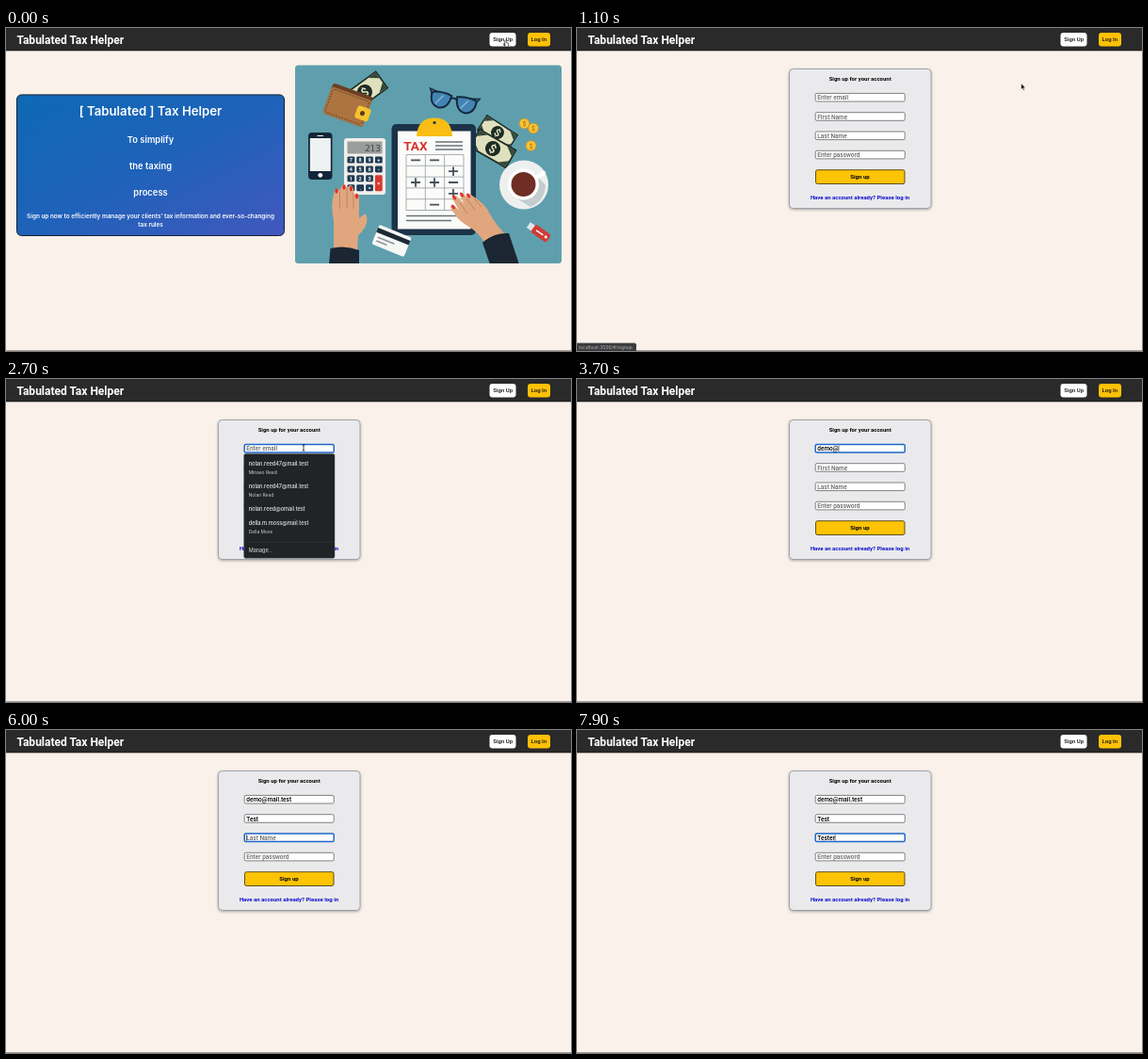
Animation of 600x343 px, one loop 8 s. Source, as an HTML page:

```html
<!DOCTYPE html>
<html lang="en">
<head>
<meta charset="utf-8">
<title>Tax sign-up</title>
<style>
  html, body { margin: 0; width: 100%; height: 100%; overflow: hidden; background: #faf2ea; }
  svg { display: block; width: 100%; height: 100%; }
  text { font-family: Roboto, sans-serif; font-weight: 500; white-space: pre; }
  .ui text, text.ui { font-family: Inter, sans-serif; }
  .hero text { font-family: Inter, sans-serif; font-weight: 600; }
  .mid { text-anchor: middle; }
  .bold { font-weight: 700; }
</style>
</head>
<body>
<svg viewBox="0 0 600 343">
  <defs>
    <linearGradient id="heroFill" x1="0" y1="0" x2="1" y2="1">
      <stop offset="0" stop-color="#0e69b4"/><stop offset=".5" stop-color="#1f62b9"/><stop offset="1" stop-color="#4258be"/>
    </linearGradient>
    <filter id="shadow" x="-10%" y="-10%" width="120%" height="120%">
      <feDropShadow dx="0" dy="1" stdDeviation="1.5" flood-opacity=".35"/>
    </filter>
    <clipPath id="photoClip"><rect x="307" y="39.5" width="283" height="210.5" rx="3.5"/></clipPath>
    <g id="bill">
      <rect x="-20" y="-10" width="40" height="20" fill="#1d2b25"/>
      <rect x="-18.5" y="-8.5" width="37" height="17" fill="#dfe0bd"/>
      <path d="M-18.5 -8.5h8l-8 6zM18.5 -8.5h-8l8 6zM-18.5 8.5h8l-8 -6zM18.5 8.5h-8l8 -6z" fill="#34483b"/>
      <circle r="7" fill="#1d2b25"/>
      <text class="mid bold" y="4" font-size="11" fill="#dfe0bd">$</text>
    </g>
    <g id="coin">
      <circle r="5.8" fill="#d39a20"/><circle r="4.8" fill="#f7c53c"/>
      <text class="mid bold" y="2.5" font-size="7" fill="#b98116">$</text>
    </g>
  </defs>

  <rect width="600" height="343" fill="#faf2ea"/>
  <rect y="342" width="600" height="1" fill="#a09b97"/>
  <rect width="600" height="24" fill="#2a2a2a"/>
  <rect y="23.5" width="600" height=".8" fill="#151515"/>
  <text class="bold" x="11.5" y="17" font-size="12" fill="#fff">Tabulated Tax Helper</text>
  <rect x="513.5" y="5" width="28" height="14.5" rx="3" fill="#fff"/>
  <rect x="554" y="5" width="24" height="14.5" rx="3" fill="#ffc107"/>
  <g class="mid" font-size="6" fill="#111">
    <text x="527.7" y="14.4">Sign Up</text><text x="565.8" y="14.4">Log In</text>
  </g>

  <g id="home">
    <rect x="11.5" y="70.9" width="284" height="149.6" rx="5" fill="url(#heroFill)" stroke="#142033"/>
    <g class="mid hero" fill="#fff">
      <text x="153.5" y="93" font-size="13.2">[ Tabulated ] Tax Helper</text>
      <g font-size="9.4">
        <text x="153.5" y="121.8">To simplify</text><text x="153.5" y="149.8">the taxing</text><text x="153.5" y="177.8">process</text>
      </g>
      <g font-size="6.4">
        <text x="153.5" y="202.3">Sign up now to efficiently manage your clients’ tax information and ever-so-changing</text>
        <text x="153.5" y="211.2">tax rules</text>
      </g>
    </g>

    <g clip-path="url(#photoClip)">
      <rect x="307" y="39" width="283" height="212" fill="#5f9fad"/>

      <!-- wallet -->
      <use href="#bill" transform="translate(381 68) rotate(-36) scale(1.15)"/>
      <g transform="translate(363.5 82) rotate(20)">
        <rect x="-23" y="-17" width="45" height="34" rx="3" fill="#6b4023"/>
        <rect x="-23" y="-13" width="45" height="30" rx="3" fill="#ab7440"/>
        <rect x="-21" y="-11" width="41" height="26" rx="2" fill="none" stroke="#5d3a1e" stroke-width=".7" stroke-dasharray="2 1.2"/>
        <rect x="10" y="-4" width="15" height="14" rx="3" fill="#f5c32c"/>
        <circle cx="17" cy="3" r="2.5" fill="#5d3a1e"/>
      </g>

      <!-- glasses -->
      <g transform="translate(475 78.5) rotate(12)" stroke="#152a40" stroke-width="2" fill="none" stroke-linecap="round">
        <path d="M-24 -4L-27 -9 -7 -5M24 -4L27 -9 7 -5" stroke-width="1.4"/>
        <path id="lens" d="M3 -6Q13 -9 24 -6Q25 7 15 9Q4 9 3 -6Z" fill="#4384b4"/>
        <use href="#lens" transform="scale(-1 1)"/>
        <path d="M-3 -3Q0 -5 3 -3"/>
        <path d="M-18 5L-12 -4M9 5L15 -4" stroke="#86b8d8" stroke-width="1.4"/>
      </g>

      <use href="#bill" transform="translate(522 111) rotate(33)"/>
      <use href="#bill" transform="translate(517 128) rotate(30) scale(1.15)"/>
      <use href="#coin" x="550.5" y="101.5"/><use href="#coin" x="560" y="106.5"/><use href="#coin" x="557.5" y="125"/>

      <!-- coffee -->
      <circle cx="550" cy="166.5" r="26" fill="#eef0ef"/>
      <path d="M539 179L557 190Q572 184 573 167L561 154Z" fill="#c3ccce"/>
      <path d="M561 160L571 154" stroke="#fff" stroke-width="4.5" stroke-linecap="round"/>
      <circle cx="549.5" cy="166" r="16.5" fill="#fff"/><circle cx="549.5" cy="166" r="13" fill="#6e2d25"/>

      <!-- phone -->
      <rect x="321" y="111" width="25.5" height="50" rx="4" fill="#12263a"/>
      <rect x="322.8" y="117" width="22" height="35" fill="#eef2f2"/>
      <path d="M330.5 114.5H337" stroke="#fff"/><circle cx="333.8" cy="156.3" r="2.4" fill="#fff"/>

      <!-- calculator -->
      <rect x="359" y="117" width="44" height="60" rx="3" fill="#f0eeea"/>
      <rect x="362.5" y="120.5" width="37" height="13" rx="1" fill="#9b9d9b"/>
      <text x="398" y="130.5" text-anchor="end" font-size="9.5" fill="#3a4347" style="font-family:'Noto Sans Mono',monospace">213</text>
      <g id="keys" class="mid"></g>

      <!-- clipboard -->
      <rect x="409.5" y="102" width="89.5" height="118" rx="5" fill="#1b3248"/>
      <rect x="416" y="109.5" width="77.5" height="104" fill="#fbfbf9"/>
      <path d="M436 115Q437 95.5 455 95.5T474 115Z" fill="#f9bd13"/>
      <circle cx="455" cy="100.5" r="1.6" fill="#1b3248"/>
      <text x="422.3" y="130" class="bold" font-size="13.5" fill="#d5342c">TAX</text>
      <path d="M456 121H485M456 125H485M456 129H485M425 199.5H487M425 204.5H473" stroke="#69737b" stroke-width="1.7"/>
      <path d="M425 134.5H486V193.5H425ZM445.3 134.5V193.5M465.6 134.5V193.5M425 146.3H486M425 158.1H486M425 169.9H486M425 181.7H486" fill="none" stroke="#a2a8ac" stroke-width=".9"/>
      <path d="M430 140.4H440M450 140.4H460M470 152.2H480M475 147.5V157M430 164H440M435 159.3V168.7M450 164H460M455 159.3V168.7M470 164H480M470 175.8H480M475 171V180.5M450 187.6H460" stroke="#46525c" stroke-width="1.8"/>

      <!-- left hand -->
      <path d="M348 238L348 204Q344 188 349 173Q352 168 354 173L356 169Q359 163 361.5 169L363 169Q367 164 369 171L369.5 177Q374 173 375 181L375 202L379 199Q383 195 383.5 203Q383 213 374 220L373 238Z" fill="#e0a77e"/>
      <path d="M354.5 174V192M362 170V191M369 175V192" stroke="#bd815c" stroke-width=".9"/>
      <g fill="#dc302e">
        <ellipse cx="351" cy="173" rx="1.6" ry="2.8"/><ellipse cx="359" cy="169" rx="1.6" ry="2.8"/>
        <ellipse cx="366.5" cy="170.5" rx="1.6" ry="2.8"/><ellipse cx="372.5" cy="178.5" rx="1.6" ry="2.8"/>
      </g>
      <path d="M343 251L344.5 234Q360 230 375 236V251Z" fill="#1b2632"/>

      <!-- right hand -->
      <path d="M509 229Q502 217 490 210Q480 204 477 198Q470 190 473 188Q477 188 482 195L474 181Q474 176 478 178L487 187L482 178Q484 173 487 177L495 185L489 179Q491 173 495 178Q509 187 513 196Q520 209 533 222Z" fill="#e0a77e"/>
      <path d="M482 186L490 197M489 181L498 193M497 181L505 190" stroke="#bd815c" stroke-width=".9"/>
      <g fill="#dc302e">
        <ellipse cx="475" cy="190" rx="1.5" ry="2.8" transform="rotate(-35 475 190)"/><ellipse cx="476" cy="180" rx="1.5" ry="2.8" transform="rotate(-35 476 180)"/>
        <ellipse cx="484" cy="177" rx="1.5" ry="2.8" transform="rotate(-35 484 177)"/><ellipse cx="491" cy="178" rx="1.5" ry="2.8" transform="rotate(-35 491 178)"/>
      </g>
      <path d="M506 228Q518 217 534 218L545 251H514Z" fill="#1b2632"/>

      <!-- bank card -->
      <g transform="translate(409.5 226) rotate(22)">
        <rect x="-18.5" y="-11" width="37" height="22" rx="2" fill="#f7f7f5"/>
        <rect x="-18.5" y="-7.5" width="37" height="5" fill="#1c2a35"/>
        <path d="M-15 2H4M-15 6H-3" stroke="#8b969c" stroke-width="1.6"/>
      </g>

      <!-- memory stick -->
      <g transform="translate(565.5 216.5) rotate(35)">
        <rect x="-13" y="-3.5" width="8" height="7" fill="#e3e6e6"/>
        <rect x="-7" y="-5" width="20" height="10" rx="2.5" fill="#d33a34"/>
        <path d="M-3 0H6" stroke="#fff" stroke-width="1.5"/><circle cx="9.5" r="1.5" fill="#fff"/>
      </g>
    </g>
  </g>

  <g id="signup">
    <rect x="225.5" y="43.5" width="150.5" height="148" rx="4" fill="#eaeaec" stroke="#8d949c" stroke-width=".8" filter="url(#shadow)"/>
    <rect x="253.5" y="150.7" width="94.5" height="14.8" rx="2" fill="#fdc305" stroke="#3a2d00" stroke-width=".8"/>
    <g class="mid" font-size="6">
      <text class="bold" x="300.7" y="56.4">Sign up for your account</text>
      <text class="bold" x="300.5" y="160.3">Sign up</text>
      <text class="bold" x="300.5" y="182.3" fill="#0c0cd0">Have an account already? Please log in</text>
    </g>
    <g id="fields"></g>
    <g id="emailMenu" class="ui"></g>
    <g id="lastMenu" class="ui"></g>
  </g>

  <g id="status">
    <path d="M0 334.5H61Q63 334.5 63 336.5V343H0Z" fill="#3b3b3d"/>
    <text class="ui" x="2" y="340.6" font-size="4.9" fill="#b4b4b6" style="font-weight:400">localhost:3000/#/signup</text>
  </g>

  <g id="hand"><path d="M-.8 3.2V-2Q0 -3.2 .8 -2V0L3.2 .6V2.4Q2.8 4 2 4.4H-.4L-2.4 1.6Q-2 .6 -.8 1.6Z" fill="#fff" stroke="#000" stroke-width=".6"/></g>
  <g id="arrow"><path d="M0 0V6.3L1.5 5 2.5 7.2 3.6 6.7 2.6 4.6H4.5Z" fill="#000" stroke="#fff" stroke-width=".5"/></g>
  <g id="beam"><path d="M-1.3 -3.3Q0 -3.3 0 -2.3Q0 -3.3 1.3 -3.3M0 -2.5V2.5M-1.3 3.3Q0 3.3 0 2.3Q0 3.3 1.3 3.3" fill="none" stroke="#111" stroke-width=".8"/></g>
</svg>

<script>
const LOOP = 8000, STEP = 100;
const PAGE_AT = 1100, TYPE_AT = 3000;
const $ = id => document.getElementById(id);
const show = (id, on) => $(id).style.display = on ? '' : 'none';
const ramp = (t, from, to) => Math.min(1, Math.max(0, (t - from) / (to - from)));
const mix = (a, b, k) => a + (b - a) * k;

$('keys').innerHTML = [...'789+456-123×0.='].map((label, i) => {
  const x = 362.5 + i % 4 * 9.8, y = 136.5 + Math.floor(i / 4) * 9.9;
  const tall = label === '×';
  return `<rect x="${x}" y="${y}" width="7.8" height="${tall ? 17 : 7}" rx="1.3" fill="${tall ? '#d8392f' : '#1f3a55'}"/>
    <text class="bold" x="${x + 3.9}" y="${y + (tall ? 10.5 : 5.5)}" font-size="5.5" fill="#fff">${label}</text>`;
}).join('');

// Each field: focus time, then times of the first key, the second key and the delay after that.
const fields = [
  { hint: 'Enter email', text: 'demo@mail.test', focus: 2200, keys: [TYPE_AT, 3300, 110] },
  { hint: 'First Name', text: 'Test', focus: 4900, keys: [5200, 5350, 150] },
  { hint: 'Last Name', text: 'Tester', focus: 6000, keys: [6600, 6900, 150] },
  { hint: 'Enter password', text: '', focus: Infinity, keys: [Infinity, Infinity, 1] }
];
$('fields').innerHTML = fields.map((f, i) => {
  const y = 69.4 + i * 20.3;
  return `<rect x="253.2" y="${y}" width="95" height="8.6" rx="1.6" fill="#fff"/>
    <text x="255.3" y="${y + 6.8}" font-size="6.5"></text>
    <rect y="${y + 1.3}" width=".6" height="6.2" fill="#000"/>`;
}).join('');
fields.forEach((f, i) => [f.box, f.label, f.caret] = [...$('fields').children].slice(i * 3, i * 3 + 3));

function buildMenu(id, top, bottom, rows) {
  const line = (y, size, color, text, weight = 400) =>
    `<text x="257.7" y="${y}" font-size="${size}" fill="${color}" style="font-weight:${weight}">${text}</text>`;
  $(id).innerHTML = `<rect x="252.7" y="${top}" width="96.3" height="${bottom - top}" rx="1.8" fill="#212426" stroke="#3b3e40" stroke-width=".4"/>
    <path d="M253 ${bottom - 17}H349" stroke="#34383a" stroke-width=".5"/>` +
    rows.map(([y, main, sub]) => line(y, 5.6, '#e6e6e6', main, 500) + (sub ? line(y + 8.9, 4.9, '#d0d0d0', sub) : '')).join('') +
    line(bottom - 6, 5.5, '#dcdcdc', 'Manage...');
}
buildMenu('emailMenu', 79.5, 190.3, [
  [92, 'nolan.reed47@mail.test', 'Minseo Reed'],
  [116.2, 'nolan.reed47@mail.test', 'Nolan Reed'],
  [140.4, 'nolan.reed@omail.test'],
  [155.4, 'della.m.moss@mail.test', 'Della Moss']
]);
buildMenu('lastMenu', 120, 167.5, [[132.4, 'Tintle', 'R. Nolan Tintle']]);

function typedCount(f, t) {
  const [first, second, delay] = f.keys;
  if (t < first) return 0;
  return t < second ? 1 : Math.min(f.text.length, 2 + Math.floor((t - second) / delay));
}

function drawFields(t) {
  const active = fields.findLastIndex(f => t >= f.focus);
  fields.forEach((f, i) => {
    const count = typedCount(f, t), focused = i === active;
    f.label.textContent = count ? f.text.slice(0, count) : f.hint;
    f.label.setAttribute('fill', count ? '#000' : '#686868');
    f.box.setAttribute('stroke', focused ? '#1f66c9' : '#626262');
    f.box.setAttribute('stroke-width', focused ? 1.5 : .8);
    const [first, second, delay] = f.keys;
    const lastKey = count > 1 ? second + (count - 2) * delay : count ? first : f.focus;
    f.caret.style.display = focused && (t - lastKey) % 1000 < 500 ? '' : 'none';
    f.caret.setAttribute('x', 255.3 + (count ? f.label.getComputedTextLength() : 0));
  });
}

function drawPointer(t) {
  const onHome = t < PAGE_AT;
  const k = 1 - (1 - ramp(t, PAGE_AT, 1900)) ** 2;
  const x = onHome ? mix(530.5, 528.8, ramp(t, 500, 900)) : mix(471.7, 316, k);
  const y = onHome ? 15.5 : mix(59, 73, k);
  const overField = !onHome && x < 348 && y > 69;
  const kind = onHome ? 'hand' : overField ? 'beam' : 'arrow';
  for (const id of ['hand', 'arrow', 'beam']) {
    show(id, id === kind && t < TYPE_AT);
    $(id).setAttribute('transform', `translate(${x} ${y})`);
  }
}

function render(t) {
  show('home', t < PAGE_AT);
  show('signup', t >= PAGE_AT);
  show('emailMenu', t >= 2300 && t < TYPE_AT);
  show('lastMenu', t >= 6600 && t < 6900);
  $('status').style.opacity = ramp(t, 0, 200) * (1 - ramp(t, 1400, 1700));
  if (t >= PAGE_AT) drawFields(t);
  drawPointer(t);
}

const start = performance.now();
function tick() {
  const t = (performance.now() - start) % LOOP;
  render(Math.floor(t / STEP) * STEP);
  requestAnimationFrame(tick);
}
tick();
</script>
</body>
</html>
```
